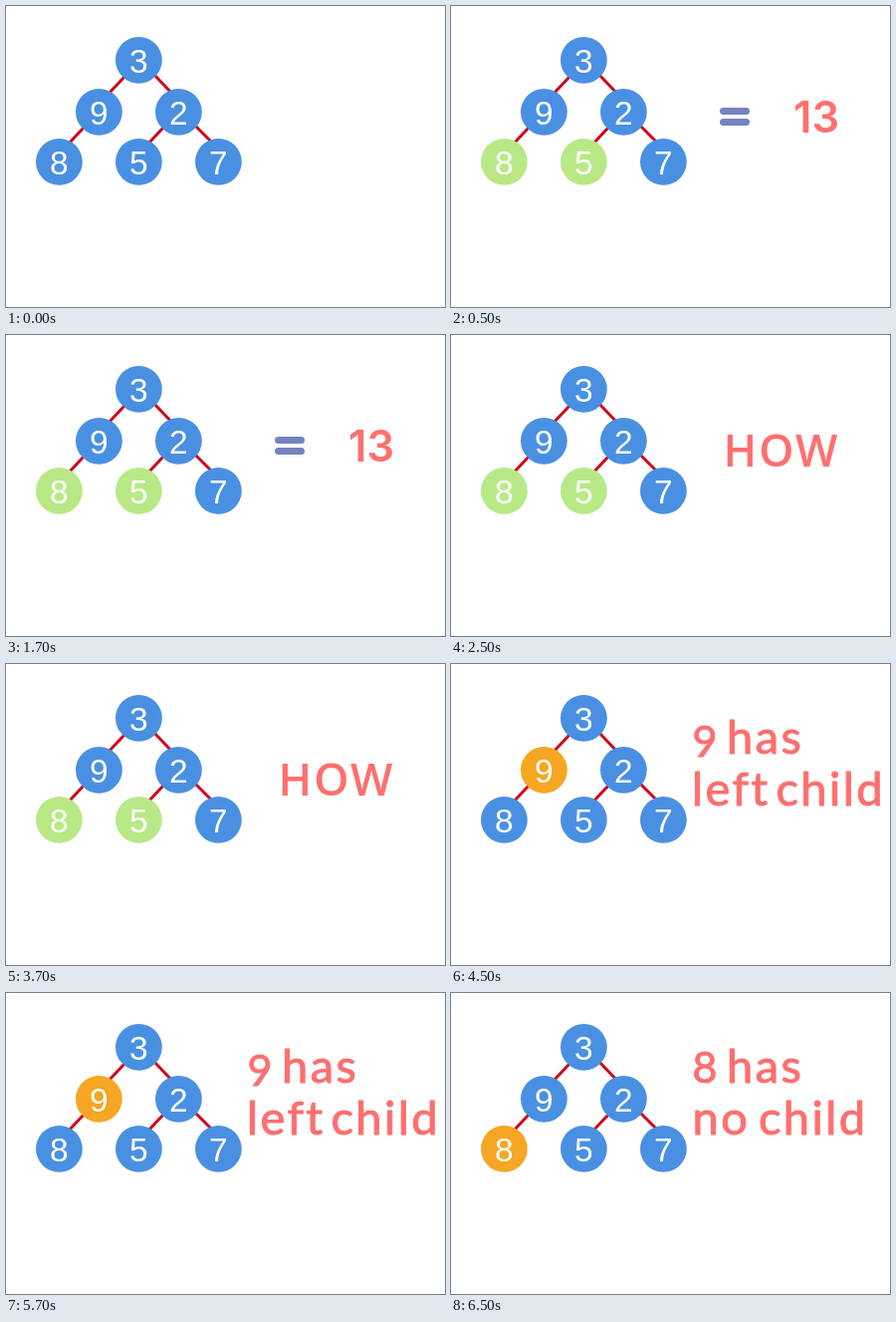
These frames come from a looping animation (441x302 px, 8 s). An HTML page:

```html
<!DOCTYPE html>
<html lang="en">
<head>
<meta charset="utf-8">
<title>Binary tree</title>
<style>
  html, body { margin: 0; width: 100%; height: 100%; overflow: hidden; background: #fff; }
  svg { display: block; width: 441px; height: 302px; }
  .edge { stroke: #d0021b; stroke-width: 3; }
  .digit { font: 400 33.5px "Liberation Sans", sans-serif; fill: #fff; text-anchor: middle; }
  .note { fill: #ff6f6f; }
  .sum { font: 600 43.5px Inter, sans-serif; }
  .how { font: 600 44.8px "Open Sans", sans-serif; letter-spacing: 2px; }
  .words { font: 400 47px Lato, sans-serif; letter-spacing: 2.4px; stroke: #ff6f6f; stroke-width: 1; stroke-linejoin: round; }
  .num { font-size: 43px; }
</style>
</head>
<body>
<svg viewBox="0 0 441 302">
  <g id="tree"></g>
  <g class="note" data-show="1">
    <rect x="270" y="102" width="30" height="7" rx="3.5" fill="#7583c1"/>
    <rect x="270" y="113" width="30" height="7" rx="3.5" fill="#7583c1"/>
    <text class="sum" x="344" y="127">13</text>
  </g>
  <g class="note" data-show="2">
    <text class="how" x="273.5" y="132">HOW</text>
  </g>
  <g class="note words" data-show="3">
    <text class="num" x="242.5" y="92.5">9</text>
    <text x="277" y="90">has</text>
    <text x="242" y="142">left</text>
    <text x="326.5" y="142">child</text>
  </g>
  <g class="note words" data-show="4">
    <text class="num" x="242.5" y="90">8</text>
    <text x="277" y="90">has</text>
    <text x="242.5" y="142">no</text>
    <text x="309" y="142">child</text>
  </g>
</svg>
<script>
  const LOOP = 8000;
  const STARTS = [0, 500, 2500, 4500, 6500];
  const BLUE = '#4a90e2', GREEN = '#b8e986', ORANGE = '#f5a623';
  const RADIUS = 23.4;

  const nodes = [
    { n: 3, x: 133.4, y: 54.3 },
    { n: 9, x: 93.4, y: 106.3, lit: { 3: ORANGE } },
    { n: 2, x: 173.4, y: 106.3 },
    { n: 8, x: 53.4, y: 156.4, lit: { 1: GREEN, 2: GREEN, 4: ORANGE } },
    { n: 5, x: 133.4, y: 156.4, lit: { 1: GREEN, 2: GREEN } },
    { n: 7, x: 213.4, y: 156.4 }
  ];
  const edges = [
    [120, 70, 103, 88], [148, 68, 167, 88], [79, 121, 63, 138],
    [159, 121, 143, 138], [190, 120, 208, 138]
  ];

  const tree = document.getElementById('tree');

  function add(tag, attrs, text = '') {
    const el = document.createElementNS('http://www.w3.org/2000/svg', tag);
    for (const key in attrs) el.setAttribute(key, attrs[key]);
    el.textContent = text;
    return tree.appendChild(el);
  }

  // Hold each step's value until the next step begins.
  function hold(el, prop, valueAt) {
    const frames = STARTS.map((t, i) => ({ offset: t / LOOP, [prop]: valueAt(i), easing: 'step-end' }));
    frames.push({ offset: 1, [prop]: valueAt(STARTS.length - 1) });
    el.animate(frames, { duration: LOOP, iterations: Infinity });
  }

  for (const [x1, y1, x2, y2] of edges) add('line', { class: 'edge', x1, y1, x2, y2 });

  for (const { n, x, y, lit } of nodes) {
    const disc = add('circle', { cx: x, cy: y, r: RADIUS, fill: BLUE });
    if (lit) hold(disc, 'fill', i => lit[i] || BLUE);
    add('text', { class: 'digit', x, y: y + 12.2 }, n);
  }

  for (const el of document.querySelectorAll('[data-show]')) {
    hold(el, 'opacity', i => (i === +el.dataset.show ? 1 : 0));
  }
</script>
</body>
</html>
```
